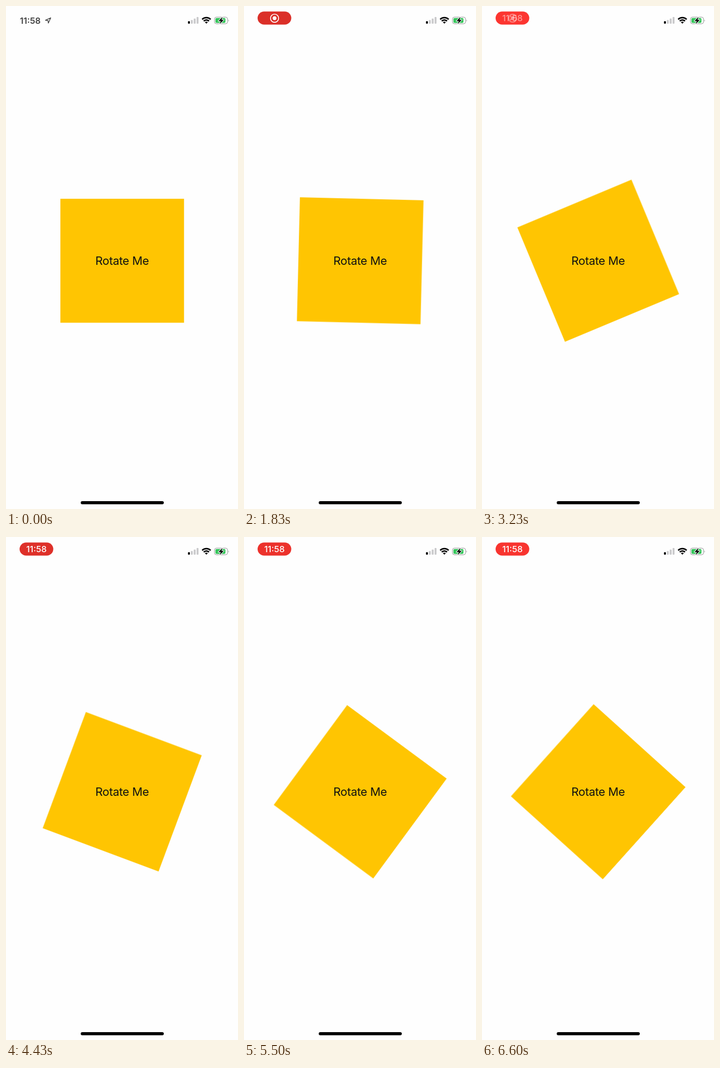
These frames come from a looping animation (444x960 px, 6670 ms). An HTML page:

```html
<!DOCTYPE html>
<html lang="en">
<head>
<meta charset="utf-8">
<title>Rotate Me</title>
<style>
  html, body { margin: 0; width: 100%; height: 100%; overflow: hidden; background: #fefefe; }
  svg { display: block; width: 444px; height: 960px; }
  text { font-family: Inter, Roboto, sans-serif; }

  .box, .clock, .pill, .icon, .pill-time { animation: 6670ms linear infinite both; }

  .box { fill: #ffc502; transform-origin: 222.4px 486.2px; animation-name: turn; }
  .clock { animation-name: clock-out; }
  .pill { animation-name: pill-in; }
  .icon { animation-name: icon; transform-origin: 58.5px 23.3px; }
  .pill-time { animation-name: time-in; }
  .glow { animation: glow 1500ms ease-in-out -1250ms infinite alternate; }

  /* percent = ms / 66.7 */
  @keyframes turn {
    0%, 21% { transform: rotate(0deg); }
    25.5% { transform: rotate(2deg); }
    27.44% { transform: rotate(1.46deg); }
    30.4% { transform: rotate(-14deg); }
    34.5% { transform: rotate(-50deg); }
    37.93% { transform: rotate(-77.3deg); }
    40.9% { transform: rotate(-104deg); }
    42.43%, 54.4% { transform: rotate(-112.65deg); }
    57% { transform: rotate(-118deg); }
    61.5% { transform: rotate(-137deg); }
    66.42% { transform: rotate(-159.5deg); }
    75.4% { transform: rotate(-201deg); }
    80.5% { transform: rotate(-228deg); }
    82.46% { transform: rotate(-233.6deg); }
    84.5% { transform: rotate(-234.5deg); }
    88% { transform: rotate(-231deg); }
    91.5%, 100% { transform: rotate(-228deg); }
  }
  @keyframes clock-out { 0%, .5% { opacity: 1; } 4.5%, 100% { opacity: 0; } }
  @keyframes pill-in { 0%, .5% { opacity: 0; } 6%, 100% { opacity: 1; } }
  @keyframes icon {
    0%, 45.7% { opacity: 1; transform: none; }
    51.2%, 100% { opacity: 0; transform: scale(.9); }
  }
  @keyframes time-in { 0%, 45.7% { opacity: 0; } 51.2%, 100% { opacity: 1; } }
  @keyframes glow { from { fill: #db2f28; } to { fill: #fc3530; } }
</style>
</head>
<body>
<svg viewBox="0 0 444 960">
  <rect class="box" x="104.1" y="367.9" width="236.6" height="236.6"/>
  <text x="222.3" y="494.3" font-size="22" letter-spacing="-.3" text-anchor="middle" fill="#111">Rotate Me</text>

  <g class="clock">
    <text x="26.5" y="33.5" font-size="16.5" font-weight="600" fill="#444">11:58</text>
    <path d="M75.5 27.2 85.6 22.6 81 32.7 80.4 27.8Z" fill="none" stroke="#444" stroke-width="1.4" stroke-linejoin="round"/>
  </g>

  <g class="pill">
    <rect class="glow" x="26" y="10.5" width="64.5" height="25" rx="12.5"/>
    <g class="icon">
      <circle cx="58.5" cy="23.3" r="7.8" fill="none" stroke="#fff" stroke-width="1.7"/>
      <circle cx="58.5" cy="23.3" r="3.7" fill="#fff"/>
    </g>
    <text class="pill-time" x="58.3" y="29.2" font-size="16.5" font-weight="500" text-anchor="middle" fill="#fff">11:58</text>
  </g>

  <g fill="#c9c9cb">
    <rect x="348.3" y="29" width="3.6" height="4.8" rx="1" fill="#000"/>
    <rect x="353.8" y="26.8" width="3.6" height="7" rx="1"/>
    <rect x="359.3" y="24" width="3.6" height="9.8" rx="1"/>
    <rect x="364.8" y="21" width="3.6" height="12.8" rx="1"/>
  </g>

  <g fill="none" stroke="#000" stroke-width="2.7">
    <path d="M375.4 25.6a11.4 11.4 0 0 1 16.2 0"/>
    <path d="M378.4 28.8a7.2 7.2 0 0 1 10.2 0"/>
    <path d="M380.8 31 383.5 33.8 386.2 31a4 4 0 0 0-5.4 0Z" fill="#000" stroke="none"/>
  </g>

  <rect x="399" y="21.2" width="25" height="12.8" rx="3.8" fill="none" stroke="#939395"/>
  <path d="M425.6 25.5q1.8 2.1 0 4.2Z" fill="#939395"/>
  <rect x="400.8" y="23" width="19.2" height="9.2" rx="2.3" fill="#35c65b"/>
  <path d="M414.6 20.4 406.6 28.8H411L408.6 34.8 416.8 26.4H412.4Z" fill="#000" stroke="#fefefe" stroke-width="2" paint-order="stroke" stroke-linejoin="round"/>

  <rect x="143" y="945" width="159" height="6" rx="3" fill="#000"/>
</svg>
</body>
</html>
```
